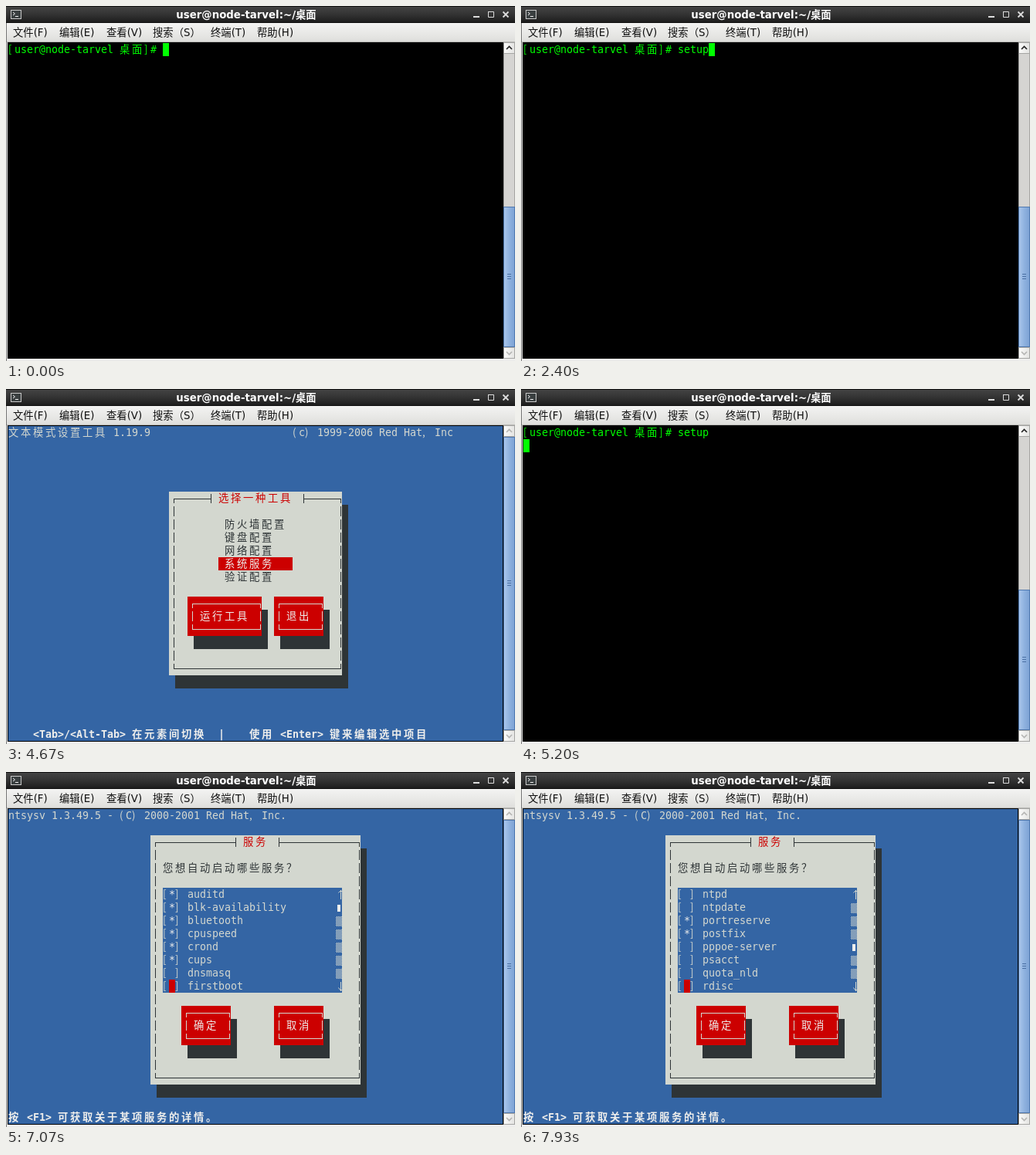
These frames come from a looping animation (659x460 px, 8000 ms). An HTML page with a canvas:

```html
<!DOCTYPE html>
<html lang="zh-CN">
<head>
<meta charset="utf-8">
<title>Terminal</title>
<style>
html, body { margin: 0; width: 100%; height: 100%; overflow: hidden; background: #ededec; }
canvas { display: block; }
</style>
</head>
<body>
<canvas id="stage" width="659" height="460"></canvas>
<script>
const ctx = document.getElementById('stage').getContext('2d');
const LOOP = 8000, CELL_W = 8, CELL_H = 17, LEFT = 3, TOP = 48;
const BLUE = '#3465a4', GREY = '#d3d7cf', DARK = '#2e3436', RED = '#cc0000', WHITE = '#eeeeec', GREEN = '#00ff00';
const CJK = '"Noto Sans CJK SC", "Noto Sans CJK", sans-serif';
const MONO = '"DejaVu Sans Mono", monospace';
const SANS = '"DejaVu Sans", ' + CJK;
const PROMPT = '[user@node-tarvel 桌面]# ';
const TOOLS = ['防火墙配置', '键盘配置', '网络配置', '系统服务', '验证配置'];

// A leading "*" marks a service that starts at boot.
const SERVICES = ('*NetworkManager *abrt-ccpp *abrtd *acpid *atd *auditd *blk-availability *bluetooth ' +
  '*cpuspeed *crond *cups dnsmasq firstboot *haldaemon htcacheclean httpd *ip6tables *iptables ' +
  '*irqbalance *kdump *lvm2-monitor *mcelogd *mdmonitor *messagebus netconsole *netfs *network ' +
  'nfs *nfslock ntpd ntpdate *portreserve *postfix pppoe-server psacct quota_nld rdisc').split(' ');
const VISIBLE = 8, HIDDEN_ROWS = 45;

const colX = c => LEFT + c * CELL_W;
const rowY = r => TOP + r * CELL_H;

function rect(x, y, w, h, color) {
  ctx.fillStyle = color;
  ctx.fillRect(x, y, w, h);
}

function cells(c, r, w, h, color) {
  rect(colX(c), rowY(r), w * CELL_W, h * CELL_H, color);
}

function gradient(x0, y0, x1, y1, ...colors) {
  const g = ctx.createLinearGradient(x0, y0, x1, y1);
  colors.forEach((color, i) => g.addColorStop(i / (colors.length - 1), color));
  return g;
}

function lines(color, width, ...paths) {
  ctx.strokeStyle = color;
  ctx.lineWidth = width;
  ctx.beginPath();
  for (const path of paths) {
    path.forEach(([x, y], i) => i ? ctx.lineTo(x, y) : ctx.moveTo(x, y));
  }
  ctx.stroke();
}

function label(text, x, y, color, font, align = 'left') {
  ctx.font = font;
  ctx.textAlign = align;
  ctx.fillStyle = color;
  ctx.fillText(text, x, y);
}

// Prints on the character grid; CJK glyphs take two cells.
function put(c, r, text, color, bold) {
  for (const ch of text) {
    const wide = ch.charCodeAt(0) > 0x2e80;
    const family = wide || '[](),'.includes(ch) ? CJK : MONO;
    label(ch, colX(c), rowY(r) + 13, color, `${bold ? 'bold ' : ''}13.333px ${family}`);
    c += wide ? 2 : 1;
  }
}

// Box-drawing frame whose sides break slightly between rows.
function frame(c, r, w, h, color, gapFrom, gapTo) {
  const x0 = colX(c) + 6, x1 = colX(c + w - 1) + 6;
  const y0 = rowY(r) + 9, y1 = rowY(r + h - 1) + 8;
  for (const y of [y0, y1]) rect(x0, y, x1 - x0 + 1, 1, color);
  for (let i = 0; i < h; i++) {
    const from = i ? rowY(r + i) + 2 : y0;
    const to = i < h - 1 ? rowY(r + i) + 15 : y1;
    for (const x of [x0, x1]) rect(x, from, 1, to - from, color);
  }
  if (gapFrom) {
    const a = colX(gapFrom) + 6, b = colX(gapTo) + 6;
    rect(a, y0, b - a, 1, GREY);
    for (const x of [a, b]) rect(x, y0 - 6, 1, 12, color);
  }
}

function dialog(c, r, w, h, title, titleCol) {
  cells(c + 1, r + 1, w, h, DARK);
  cells(c, r, w, h, GREY);
  frame(c, r, w, h, DARK, titleCol - 2, titleCol + title.length * 2 + 1);
  put(titleCol, r, title, RED);
}

function button(c, r, w, text) {
  cells(c + 1, r + 1, w, 3, DARK);
  cells(c, r, w, 3, RED);
  frame(c, r, w, 3, GREY);
  put(c + 2, r + 1, text, WHITE);
}

function drawWindow() {
  rect(0, 0, 659, 460, '#ededec');
  rect(0, 0, 659, 22, gradient(0, 0, 0, 22, '#454545', '#333333', '#1b1b1b'));
  rect(0, 0, 659, 1, '#111');
  rect(0, 21, 659, 1, '#0c0c0c');
  rect(6, 5, 14, 12, '#c8c8c8');
  rect(7, 6, 12, 10, '#3a3f40');
  lines('#eee', 1, [[9, 8], [11.5, 10], [9, 12]], [[12, 13.5], [16, 13.5]]);
  label('user@node-tarvel:~/桌面', 311, 16, '#fff', 'bold 13.333px ' + SANS, 'center');
  rect(605, 13, 8, 2, '#ddd');
  lines('#ddd', 1, [[624.5, 7.5], [631.5, 7.5], [631.5, 14.5], [624.5, 14.5], [624.5, 7]]);
  lines('#ddd', 1.8, [[643.5, 7.5], [650.5, 14.5]], [[650.5, 7.5], [643.5, 14.5]]);

  rect(0, 22, 659, 25, gradient(0, 22, 0, 47, '#f3f3f2', '#e9e9e7', '#dededb'));
  const menu = [['文件(F)', 9], ['编辑(E)', 69], ['查看(V)', 130], ['搜索（S）', 190], ['终端(T)', 265], ['帮助(H)', 325]];
  for (const [text, x] of menu) label(text, x, 39, '#111', '13.333px ' + SANS);
  rect(0, 46, 659, 1, '#b8b8b5');
  rect(0, 22, 1, 438, '#777');
  rect(2, 47, 642, 410, '#000');
}

function scrollbar(thumbTop) {
  rect(644, 47, 15, 410, '#a5a5a3');
  rect(645, 62, 13, 380, '#d5d4d2');
  const active = thumbTop > 62;
  for (const [y, dir, color] of [[47, -1, active ? '#222' : '#b5b5b3'], [442, 1, '#b5b5b3']]) {
    rect(645, y + 1, 13, 13, gradient(645, 0, 658, 0, '#fbfbfa', '#e4e4e2'));
    const cy = y + 7.5;
    lines(color, 1.6, [[648, cy - 1.5 * dir], [651.5, cy + 2 * dir], [655, cy - 1.5 * dir]]);
  }
  const h = 442 - thumbTop;
  rect(644, thumbTop, 15, h, '#5079b0');
  rect(645, thumbTop + 1, 13, h - 2, gradient(645, 0, 658, 0, '#a9c6ec', '#8fb2df', '#7ea3d5'));
  const mid = Math.floor(thumbTop + h / 2);
  for (const dy of [-4, -1, 2]) rect(649, mid + dy, 5, 1, '#4a6fa3');
}

function drawShell(typed, cursorCol, cursorRow) {
  scrollbar(260);
  put(0, 0, PROMPT + typed, GREEN);
  cells(cursorCol, cursorRow, 1, 1, GREEN);
}

function drawPointer(k) {
  const turn = 7;
  const [x, y] = k < turn
    ? [192 + 128 * k / turn, 328 + 49 * k / turn]
    : [320 - 15 * (k - turn) / 3, 377 - 22 * (k - turn) / 3];
  const px = Math.round(x), py = Math.round(y);
  rect(px, py - 7, 1, 15, '#fff');
  for (const edge of [-8, 8]) rect(px - 3, py + edge, 7, 1, '#fff');
}

function blueScreen() {
  scrollbar(62);
  cells(0, 0, 80, 24, BLUE);
}

function drawTools(selected) {
  blueScreen();
  put(0, 0, '文本模式设置工具 1.19.9', GREY);
  put(46, 0, '(c) 1999-2006 Red Hat, Inc', GREY);
  dialog(26, 5, 28, 14, '选择一种工具', 34);
  cells(34, 7 + selected, 12, 1, RED);
  TOOLS.forEach((name, i) => put(35, 7 + i, name, i === selected ? WHITE : DARK));
  button(29, 13, 12, '运行工具');
  button(43, 13, 8, '退出');
  put(4, 23, '<Tab>/<Alt-Tab> 在元素间切换  |', WHITE, true);
  put(39, 23, '使用 <Enter> 键来编辑选中项目', WHITE, true);
}

function listScrollbar(top) {
  const x = colX(53), thumb = 1 + Math.floor(top * 5 / HIDDEN_ROWS);
  for (let i = 0; i < VISIBLE; i++) {
    const y = rowY(6 + i);
    if (i === 0 || i === VISIBLE - 1) {
      const tip = i ? y + 14 : y + 3, dir = i ? -1 : 1;
      rect(x + 6, y + 3, 1, 12, GREY);
      lines(GREY, 1, [[x + 3.5, tip + 3.5 * dir], [x + 6.5, tip + 0.5]]);
      rect(x + 7, tip + dir, 1, 1, GREY);
    } else if (i === thumb) {
      rect(x + 2, y + 5, 4, 9, WHITE);
    } else {
      for (let dy = 3; dy < 16; dy++) {
        for (let dx = dy % 2; dx < 8; dx += 2) rect(x + dx, y + dy, 1, 1, GREY);
      }
    }
  }
}

function drawServices(current) {
  const top = Math.max(0, current - VISIBLE + 1);
  blueScreen();
  put(0, 0, 'ntsysv 1.3.49.5 - (C) 2000-2001 Red Hat, Inc.', GREY);
  dialog(23, 2, 34, 19, '服务', 38);
  put(25, 4, '您想自动启动哪些服务？', DARK);
  cells(25, 6, 29, VISIBLE, BLUE);
  SERVICES.slice(top, top + VISIBLE).forEach((entry, i) => {
    const on = entry[0] === '*', row = 6 + i;
    put(25, row, '[ ]', GREY);
    if (top + i === current) cells(26, row, 1, 1, RED);
    if (on) put(26, row, '*', WHITE);
    put(29, row, entry.slice(on ? 1 : 0), GREY);
  });
  listScrollbar(top);
  button(28, 15, 8, '确定');
  button(43, 15, 8, '取消');
  put(0, 23, '按 <F1> 可获取关于某项服务的详情。', WHITE, true);
}

const passed = (marks, tick) => marks.filter(m => tick >= m).length;

function currentService(tick) {
  if (tick < 101) return tick < 94 ? 0 : 1;
  return 2 * (tick - 100) - (tick > 106 ? 2 : 0);
}

function draw(tick) {
  drawWindow();
  if (tick < 46) {
    const count = passed([22, 25, 29, 34, 36], tick);
    drawShell('setup'.slice(0, count), 25 + count, 0);
    if (tick >= 6 && tick < 21) drawPointer(Math.min(tick - 6, 10));
  } else if (tick < 78) {
    drawTools(passed([64, 67, 70], tick));
  } else if (tick < 79) {
    drawShell('setup', 0, 1);
  } else {
    drawServices(currentService(tick));
  }
}

let shown = -1;
function animate(now) {
  // 15 ticks per second, aligned to hundredths of a second.
  const tick = Math.floor((Math.floor(now % LOOP / 10) + 0.5) * 0.15);
  if (tick !== shown) draw(shown = tick);
  requestAnimationFrame(animate);
}
requestAnimationFrame(animate);
</script>
</body>
</html>
```
